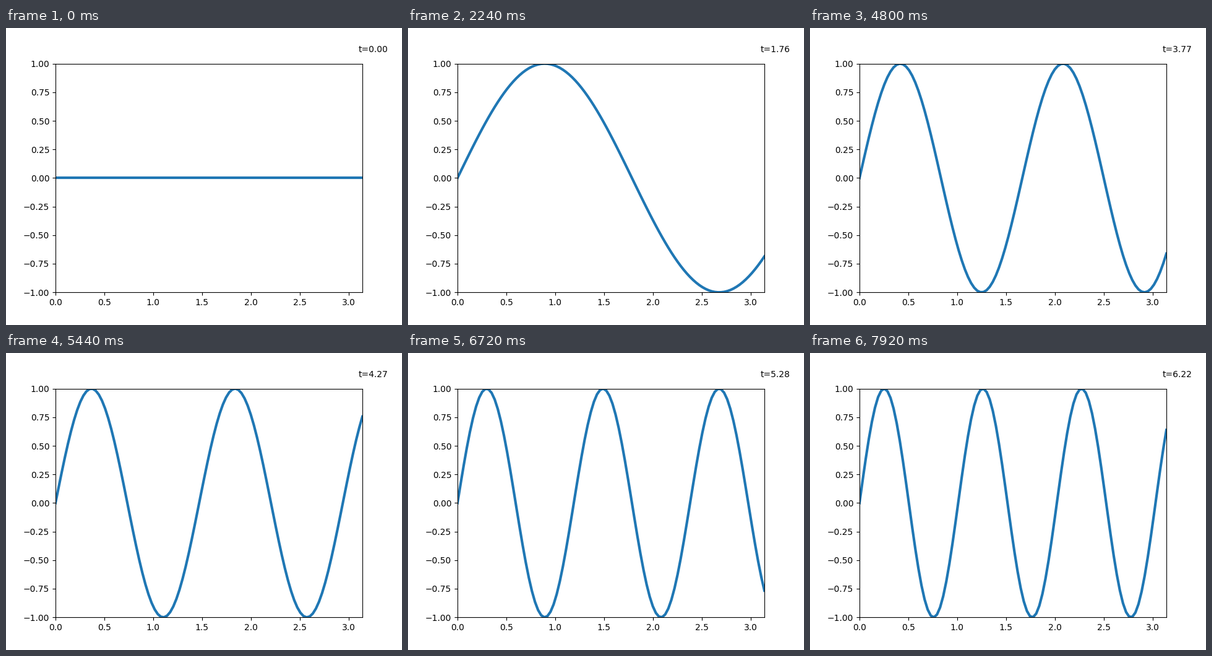
Animation, 640 px wide and 480 px high, one loop 8000 ms. Source, as a matplotlib script:

```python
import numpy as np
import matplotlib.pyplot as plt
from matplotlib.animation import FuncAnimation

FRAMES = 100
INTERVAL = 80  # ms

plt.rcParams["font.family"] = "DejaVu Sans"

fig, ax = plt.subplots(figsize=(6.4, 4.8), dpi=100)
ax.set_xlim(0, np.pi)
ax.set_ylim(-1, 1)

x = np.linspace(0, np.pi, 100)
line, = ax.plot(x, np.zeros_like(x), color="C0", lw=3)
label = ax.text(3.1, 1.1, "t=0.00")


def update(i):
    """Sine wave whose wavenumber grows from 0 towards 2 pi."""
    t = 2 * np.pi * i / FRAMES
    line.set_ydata(np.sin(t * x))
    label.set_text(f"t={t:.2f}")
    return line, label


anim = FuncAnimation(fig, update, frames=FRAMES, interval=INTERVAL,
                     repeat=True, repeat_delay=0)
plt.show()
```
